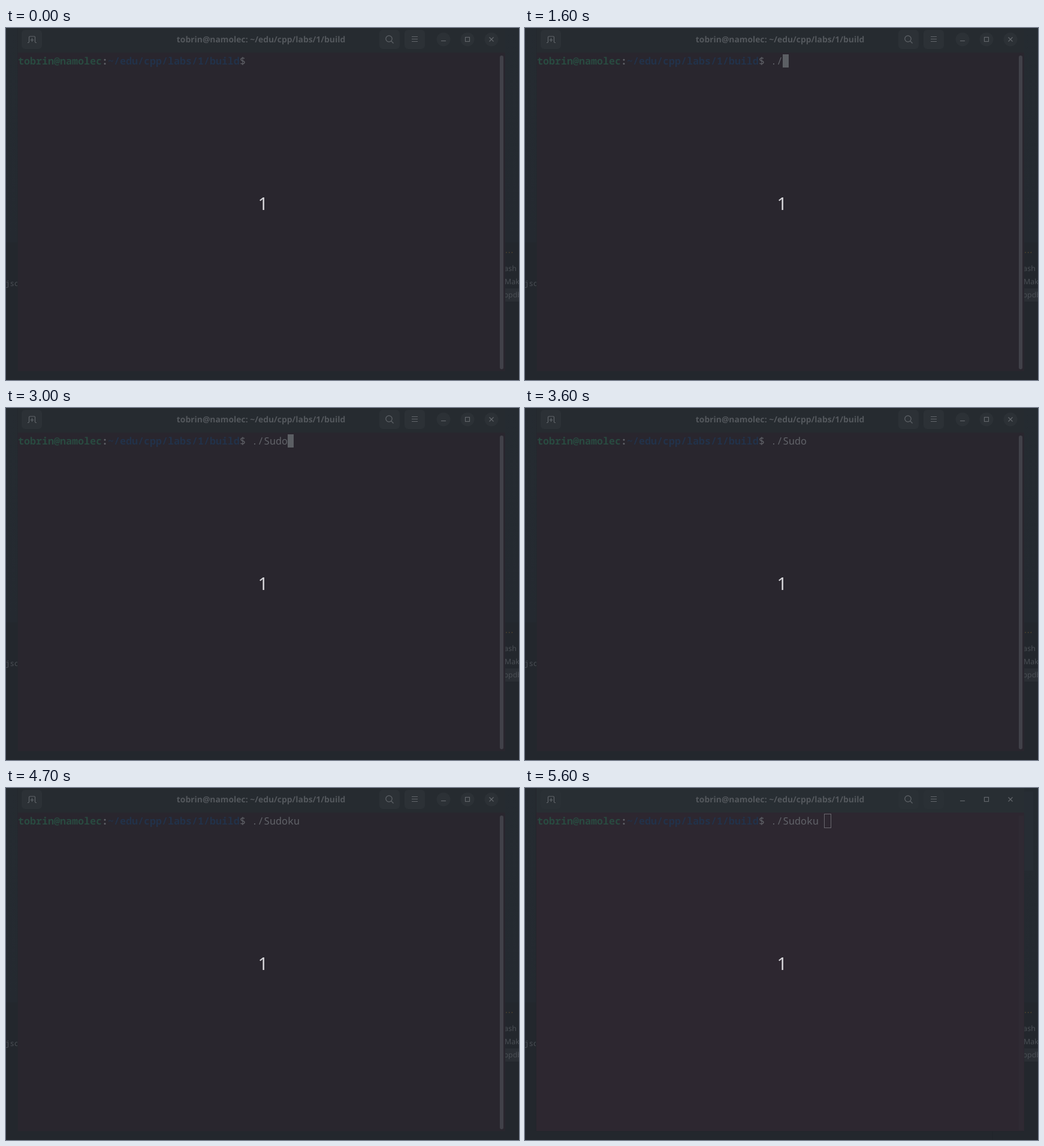
Write an HTML page that moves like this. It is 856 px wide and 588 px high and loops after 8 s.

```html
<!DOCTYPE html>
<html lang="en">
<head>
<meta charset="utf-8">
<title>Terminal</title>
<style>
  html, body { margin: 0; width: 100%; height: 100%; overflow: hidden; background: #24292f; }
  svg { display: block; width: 856px; height: 588px; }
  text { white-space: pre; }
  .sans { font-family: "Noto Sans", "Open Sans", sans-serif; }
  .mono { font-family: "Noto Sans Mono", "DejaVu Sans Mono", monospace; }
  .term { font-size: 16.667px; fill: #606268; }
  .side { font-size: 12.4px; fill: #4b4f55; }
  .bold { font-weight: 700; }
  .icons { fill: none; stroke: #62666b; stroke-width: 1.2; }
</style>
</head>
<body>
<svg viewBox="0 0 856 588" text-rendering="geometricPrecision">
  <defs>
    <linearGradient id="desk" x1="0" y1="0" x2="0" y2="1">
      <stop offset="0" stop-color="#252b31"/>
      <stop offset="1" stop-color="#242930"/>
    </linearGradient>
  </defs>

  <!-- desktop behind the window -->
  <rect width="856" height="358" fill="url(#desk)"/>
  <rect y="358" width="856" height="230" fill="#23272d"/>
  <rect x="833" y="435" width="23" height="22" fill="#2a2e34"/>
  <text class="mono" x="-1" y="431" font-size="12.5" fill="#4b4f55">json</text>
  <g fill="#51452f">
    <circle cx="835" cy="375" r=".9"/><circle cx="839.7" cy="375" r=".9"/><circle cx="844.4" cy="375" r=".9"/>
  </g>
  <text class="sans side" x="831.3" y="406">ash</text>
  <text class="sans side" x="832" y="428">Make</text>
  <text class="sans side" x="830.5" y="450">ppdbg</text>

  <!-- focused window -->
  <rect x="19" y="0" width="814" height="574" fill="#24272d"/>
  <rect x="20" y="0" width="813" height="41" fill="#262b30"/>
  <rect x="20" y="41" width="813" height="532" fill="#29262e"/>
  <g fill="#2c3136">
    <rect x="26" y="3" width="34" height="32" rx="6"/>
    <rect x="623" y="3" width="34" height="32" rx="6"/>
    <rect x="665" y="3" width="34" height="32" rx="6"/>
    <circle cx="730" cy="19" r="11.5"/><circle cx="770" cy="19" r="11.5"/><circle cx="810" cy="19" r="11.5"/>
  </g>
  <rect x="824" y="46" width="6" height="524" rx="3" fill="#414149"/>

  <!-- unfocused window, faded in on top -->
  <g id="backdrop" opacity="0">
    <rect x="833" y="6" width="15" height="132" fill="#272d34"/>
    <rect x="780" y="574" width="1" height="14" fill="#20242a"/>
    <rect x="18" y="0" width="815" height="574" fill="#22252b"/>
    <rect x="19" y="0" width="814" height="41" fill="#282e33"/>
    <rect x="19" y="41" width="814" height="532" fill="#2d2730"/>
    <rect x="824" y="46" width="8" height="526" fill="#2f2a33"/>
    <g fill="#2a3035">
      <rect x="26" y="3" width="34" height="32" rx="6"/>
      <rect x="623" y="3" width="34" height="32" rx="6"/>
      <rect x="665" y="3" width="34" height="32" rx="6"/>
    </g>
  </g>

  <!-- title bar -->
  <text class="sans bold" x="425.5" y="24" text-anchor="middle" font-size="13.9" fill="#54585d">tobrin@namolec: ~/edu/cpp/labs/1/build</text>
  <g class="icons">
    <path d="M36 24.5h1q1.5 0 1.5-1.5v-7.5q0-1.5 1.5-1.5h7q1.5 0 1.5 1.5v7.5q0 1.5 1.5 1.5h1M43.5 17v6M40.5 20h6"/>
    <circle cx="639" cy="18" r="5.2"/>
    <path d="M642.8 21.8l3.7 3.7"/>
    <path d="M677 14.5h10M677 18.5h10M677 22.5h10"/>
    <path d="M726 21.5h8"/>
    <rect x="766.5" y="15.5" width="7" height="7"/>
    <path d="M806.5 15.5l7 7M813.5 15.5l-7 7"/>
  </g>

  <!-- command line -->
  <text class="mono term bold" x="20" y="61" style="fill:#294a40">tobrin@namolec</text>
  <text class="mono term bold" x="160" y="61">:</text>
  <text class="mono term bold" x="170" y="61" style="fill:#22324a">~/edu/cpp/labs/1/build</text>
  <text class="mono term" x="390" y="61">$</text>
  <text class="mono term" id="cmd" x="410" y="61"></text>
  <rect id="block" y="44" width="10" height="22" fill="#5c5f64"/>
  <rect id="hollow" x="499.5" y="43.5" width="11" height="23" fill="none" stroke="#6a686f"/>

  <text class="sans" x="420.5" y="304" font-size="29.4" fill="#d5d4d8">1</text>
</svg>
<script>
  const LOOP = 8000, BLUR = 5400, CELL = 10;
  const COMMAND = "./Sudoku ";
  // [time, characters typed, cursor lit]
  const STEPS = [
    [0, 0, false], [300, 0, true], [400, 1, true], [900, 1, false],
    [1500, 1, true], [1600, 2, true], [2300, 3, true], [2600, 4, true],
    [2800, 5, true], [3000, 6, true], [3600, 6, false], [4100, 7, true],
    [4200, 9, true], [4700, 9, false], [5300, 9, true]
  ];
  const el = id => document.getElementById(id);
  const cmd = el("cmd"), block = el("block"), hollow = el("hollow"), backdrop = el("backdrop");
  const show = (node, on) => node.setAttribute("visibility", on ? "visible" : "hidden");

  function draw(t) {
    const [, typed, lit] = STEPS.filter(s => s[0] <= t).pop();
    const blurred = t >= BLUR;
    cmd.textContent = COMMAND.slice(0, typed);
    block.setAttribute("x", 410 + typed * CELL);
    show(block, lit && !blurred);
    show(hollow, blurred);

    // focus fades out in 100 ms steps, easing out
    const tick = Math.floor((t - BLUR) / 100) + 1;
    const k = Math.min(1, Math.max(0, tick / 3));
    backdrop.setAttribute("opacity", 1 - (1 - k) ** 2);
  }

  const start = performance.now();
  function frame() {
    draw((performance.now() - start) % LOOP);
    requestAnimationFrame(frame);
  }
  frame();
</script>
</body>
</html>
```
